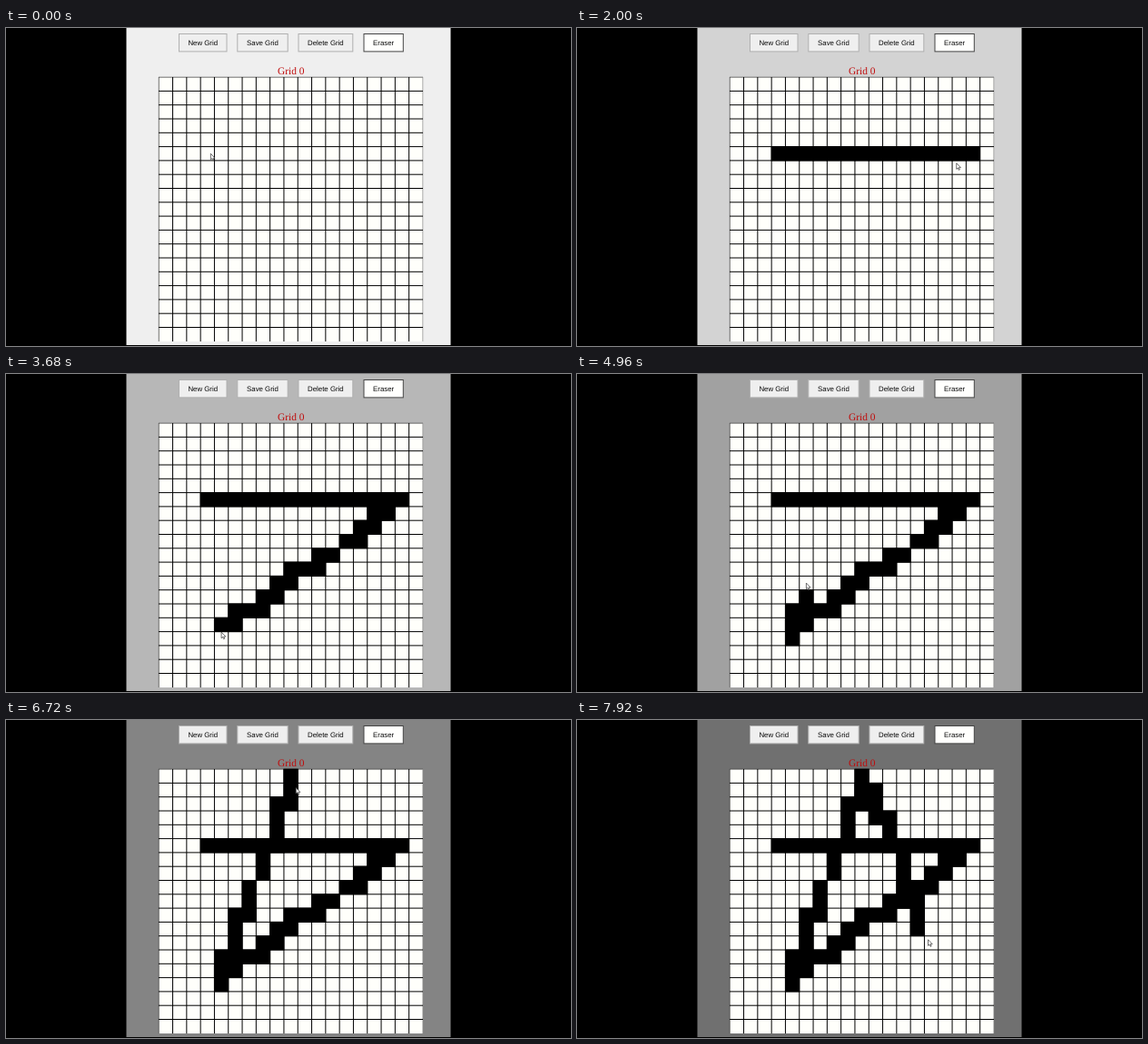
Animation of 622 by 350 pixels, one loop 8 s. Source, as an HTML page:

```html
<!DOCTYPE html>
<html lang="en">
<head>
<meta charset="utf-8">
<title>Grid drawing</title>
<style>
  html, body { margin: 0; width: 100%; height: 100%; overflow: hidden; background: #000; }
  svg { display: block; width: 622px; height: 350px; }
  text { text-anchor: middle; text-rendering: geometricPrecision; }
  #buttons { font: 7.85px "Liberation Sans", Arial, sans-serif; fill: #080808; }
  #title { font: 11.4px "Liberation Serif", "Times New Roman", serif; fill: #c00a0a; }
</style>
</head>
<body>
<svg viewBox="0 0 622 350">
  <rect id="panel" x="132.5" width="357" height="349"/>
  <g id="buttons"></g>
  <text id="title" x="313.7" y="51.3">Grid 0</text>
  <rect x="168" y="54" width="291" height="291" fill="#fffffb"/>
  <path d="M168.3 54V345M168 54.2H459" stroke="#333" stroke-width=".7"/>
  <path d="M458.8 54V345" stroke="#888" stroke-width=".7"/>
  <path id="lines" stroke="#000"/>
  <g id="cells"></g>
  <path id="cursor" d="M0 0V6.6L1.5 5.3L2.6 7.6L3.6 7.1L2.6 4.9H4.7Z" fill="#fff" stroke="#333" stroke-width=".7"/>
</svg>
<script>
const LOOP = 8000, STEP = 80, PITCH = 15.3, LEFT = 168.25, TOP = 54.1;
const $ = id => document.getElementById(id);

function add(parent, tag, attrs, text = '') {
  const el = document.createElementNS('http://www.w3.org/2000/svg', tag);
  for (const k in attrs) el.setAttribute(k, attrs[k]);
  el.textContent = text;
  return parent.appendChild(el);
}

function button(x, width, label, fill = '#efefef', stroke = '#b0b0b0') {
  add($('buttons'), 'rect', { x, y: 6.5, width, height: 19.4, fill, stroke });
  add($('buttons'), 'text', { x: x + width / 2, y: 18.8 }, label);
}
button(190.5, 52.5, 'New Grid');
button(254.8, 55.4, 'Save Grid');
button(322, 59.8, 'Delete Grid');
button(394, 43.3, 'Eraser', '#fffffd', '#444');

let lines = '';
for (let i = 1; i < 19; i++) {
  lines += `M${LEFT + i * PITCH} 54V345M168 ${TOP + i * PITCH}H459`;
}
$('lines').setAttribute('d', lines);

// The stroke as steps between cells: S start, A down-left, B up-right, F down-right.
// The last step only leads the cursor out.
const moves = { S: [0, 0], R: [1, 0], L: [-1, 0], U: [0, -1], D: [0, 1], A: [-1, 1], B: [1, -1], F: [1, 1] };
const stroke = 'S' + 'R'.repeat(14) + 'LDLDLDLALDLLDLDLDLLDLD' + 'UUBUURUUBUBUUURUU' + 'DRDDRDDRDDDDRDDF';
let col = 3, row = 5;
const path = [...stroke].map(c => [col += moves[c][0], row += moves[c][1]]);
const cells = path.slice(0, -1).map(([c, r]) => add($('cells'), 'rect', {
  x: LEFT + c * PITCH - .5, y: TOP + r * PITCH - .5, width: PITCH + 1, height: PITCH + 1
}));

// Time and place along the stroke, in cells
const pace = [[0, 0], [480, 0], [1280, 8], [1920, 15], [2720, 23.8], [3680, 36], [4480, 37],
  [4960, 40], [6160, 52], [6720, 54.2], [7040, 56], [7920, 69]];

function progress(t) {
  const i = pace.findIndex(k => k[0] >= t) || 1;
  const [t0, p0] = pace[i - 1], [t1, p1] = pace[i];
  return p0 + (p1 - p0) * (t - t0) / (t1 - t0);
}

function pointAt(p) {
  p = Math.max(0, Math.min(path.length - 1, p));
  const i = Math.floor(p), a = path[i], b = path[i + 1] || a;
  return a.map((v, n) => v + (b[n] - v) * (p - i));
}

// The hand rounds the corners between cells.
function cursorAt(p) {
  const near = [p - .7, p, p + .7].map(pointAt);
  const mean = n => near.reduce((sum, q) => sum + q[n], 0) / 3 + .5;
  return [LEFT + mean(0) * PITCH, TOP + mean(1) * PITCH];
}

function draw(now) {
  const t = Math.floor(now % LOOP / STEP) * STEP;
  const p = progress(t);
  const shade = Math.round(239 - Math.max(0, t - 300) / 60);
  $('panel').setAttribute('fill', `rgb(${shade},${shade},${shade})`);
  cells.forEach((c, i) => c.setAttribute('visibility', i + 1 <= p + 1e-6 ? 'visible' : 'hidden'));
  $('cursor').setAttribute('transform', `translate(${cursorAt(p)})`);
}

let start;
function frame(now) {
  start ??= now;
  draw(now - start);
  requestAnimationFrame(frame);
}
draw(0);
requestAnimationFrame(frame);
</script>
</body>
</html>
```
